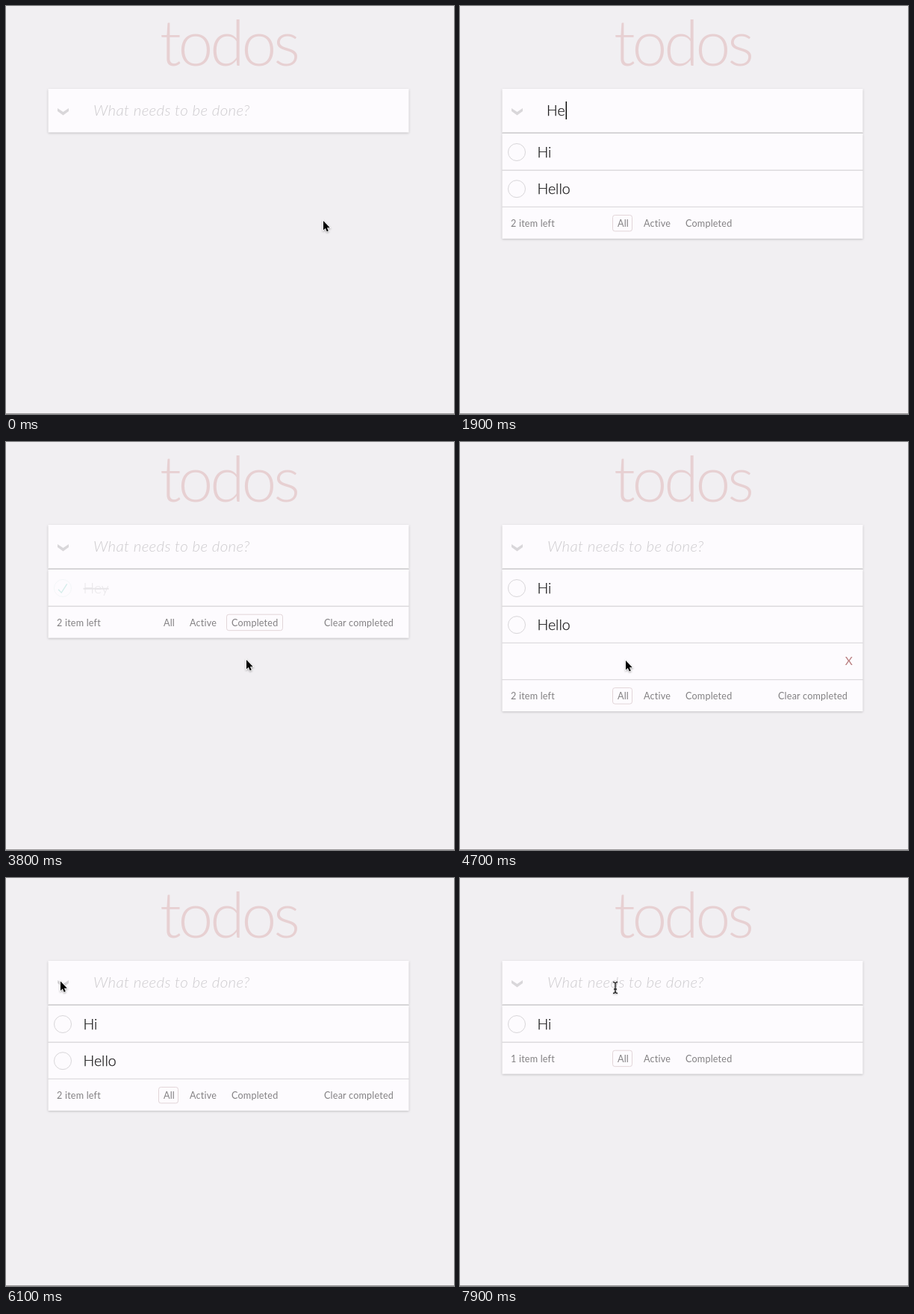
An HTML page that plays this animation: 600 by 547 pixels, repeating every 8000 ms.

```html
<!DOCTYPE html>
<html lang="en">
<head>
<meta charset="utf-8">
<title>todos</title>
<style>
html, body { margin: 0; width: 100%; height: 100%; overflow: hidden; background: #f1eff2; }
svg { display: block; font-family: Lato, "Open Sans", sans-serif; }
.title { font-size: 84px; font-weight: 300; letter-spacing: -4.1px; fill: #e7d0d2; }
.panel { fill: #fdfbfe; filter: drop-shadow(0 1px 1.5px rgba(0, 0, 0, .2)); }
.hint { font-size: 20.5px; font-weight: 300; font-style: italic; letter-spacing: .33px; fill: #cdcbce; }
.item { font-size: 19.5px; font-weight: 300; fill: #1d1c1d; stroke: #1d1c1d; stroke-width: .25; }
.done { fill: #d3d1d4; stroke: none; text-decoration: line-through; }
.foot { font-size: 12.6px; letter-spacing: .2px; fill: #838183; }
.kill { font-size: 15.5px; fill: #b97c7e; }
</style>
</head>
<body>
<svg id="stage" width="600" height="547" viewBox="0 0 600 547"></svg>
<script>
const LOOP = 8000, STEP = 100, TOP = 171, ROW = 49.2;
const stage = document.getElementById('stage');
const clamp = u => Math.min(1, Math.max(0, u));
const text = (cls, x, y, s) => `<text class="${cls}" x="${x}" y="${y}">${s}</text>`;

const words = [
  { name: 'Hi', from: 300, t: 900 },
  { name: 'Hello', from: 1000, t: 1400 },
  { name: 'Hey', from: 1800, t: 2100 }
];
const blurAt = 2700;

// Each stop of the pointer: click time, place, time it rests there, effect
const stop = (t, x, y, act = () => {}, rest = 0) => ({ t, x, y, act, rest });
const show = filter => s => { s.filter = filter; };
const check = (...names) => s => {
  s.items.filter(d => names.includes(d.name)).forEach(d => { d.done = !d.done; });
  s.clear = true;
};
const clear = s => {
  s.items = s.items.filter(d => !d.done);
  s.clear = false;
};
const stops = [
  stop(0, 425, 288, undefined, 2200),
  stop(blurAt, 77, 296, check('Hey')),
  stop(3300, 263, 350, show('Active')),
  stop(3600, 322, 292, show('Completed'), 200),
  stop(4200, 259, 243, show('Active')),
  stop(4700, 222, 293, show('All')),
  stop(5400, 523, 297, s => { s.items.pop(); }, 100),
  stop(6500, 73, 138.5, check('Hi', 'Hello')),
  stop(7000, 76, 194, check('Hi')),
  stop(7500, 471, 292, clear),
  stop(7900, 208, 147)
];
const add = w => ({ t: w.t, act: s => s.items.push({ name: w.name, done: false }) });
const events = [...words.map(add), ...stops].sort((a, b) => a.t - b.t);

function stateAt(t) {
  const s = { items: [], filter: 'All', clear: false, changed: 0 };
  for (const e of events.filter(e => e.t <= t)) {
    e.act(s);
    s.changed = e.t;
  }
  return s;
}

function pointerAt(t) {
  const i = stops.findLastIndex(p => p.t <= t);
  const a = stops[i], b = stops[i + 1] || a, leave = a.t + a.rest;
  const u = clamp((t - leave) / Math.max(1, Math.min(500, b.t - leave)));
  const e = u * (2 - u);
  return { x: a.x + (b.x - a.x) * e, y: a.y + (b.y - a.y) * e, shown: t < words[0].from || t >= stops[0].rest };
}

function typedAt(t) {
  const w = words.find(w => t >= w.from && t < w.t);
  return w ? w.name.slice(0, 1 + Math.floor((t - w.from) / 80)) : '';
}

function row(d, i, fade, hover) {
  const y = TOP + ROW * i, mid = y + 25;
  const mark = d.done
    ? `<g transform="translate(64.2 ${mid - 11.8}) scale(.235)" opacity=".5">
       <circle cx="50" cy="50" r="49" fill="none" stroke="#d3e5e3" stroke-width="4"/>
       <path d="M72 25L42 71 27 56l-4 4 20 20 34-52z" fill="#5dc2af"/></g>`
    : `<circle cx="76" cy="${mid}" r="11.5" fill="none" stroke="#d8d6d9"/>`;
  const label = text(d.done ? 'item done' : 'item', 103.5, mid + 7, d.name);
  return `<g opacity="${d.done ? fade : 1}">${mark}${label}</g>
    <path d="M56 ${y + ROW}h484" stroke="#dddbde" stroke-width="1.4"/>` +
    (hover ? text('kill', 515.7, mid + 5, 'X') : '');
}

function footer(s, y) {
  const tabs = { All: [211, 13], Active: [246, 34], Completed: [302, 62] };
  const [x, w] = tabs[s.filter];
  const left = s.items.filter(d => !d.done).length;
  return `<rect x="${x - 6.5}" y="${y - 15.5}" width="${w + 13}" height="21.5" rx="3" fill="none" stroke="#e2d5d8"/>` +
    text('foot', 68, y, left + ' item left') +
    Object.keys(tabs).map(k => text('foot', tabs[k][0], y, k)).join('') +
    (s.clear ? text('foot', 426, y, 'Clear completed') : '');
}

function cursor({ x, y, shown }) {
  if (!shown) return '';
  const beam = x > 100 && x < 540 && y > 111 && y < 169;
  const d = beam ? 'M-3-7.5q3 0 3 2.5V5q0 2.5-3 2.5M3-7.5q-3 0-3 2.5V5q0 2.5 3 2.5M-2 2h4'
    : 'M0 0v12.6l2.8-2.6 2 4.5 2-.9-1.9-4.3h3.9z';
  const paint = beam ? 'fill="none" stroke="#222" stroke-width="1.3"'
    : 'stroke="#fff" stroke-width="1.6" paint-order="stroke"';
  return `<path d="${d}" transform="translate(${x} ${y})" ${paint} style="filter:drop-shadow(0 1px 1px #0005)"/>`;
}

function list(s, t, at) {
  const rows = s.items.filter(d => s.filter === 'All' || d.done === (s.filter === 'Completed'));
  const height = ROW * rows.length;
  const over = at.shown ? Math.floor((at.y - TOP) / ROW) : -1;
  const fade = clamp((t - s.changed) / 400);
  return `<rect class="panel" x="56.5" y="${TOP}" width="483" height="${height + 42.5}"/>
    <path d="M56.5 170.4h483" stroke="#cfcdd0" stroke-width="1.4"/>` +
    rows.map((d, i) => row(d, i, fade, i === over)).join('') + footer(s, TOP + height + 26.5);
}

function draw(t) {
  const s = stateAt(t), typed = typedAt(t), at = pointerAt(t);
  const caret = t >= 100 && t < blurAt && (t - 100) % 800 < 700;

  stage.innerHTML = text('title', 206, 80, 'todos') +
    '<rect class="panel" x="56.5" y="111" width="483" height="58.5"/>' +
    '<path d="M69 137l7.5 5 7.5-5v4l-7.5 5.6-7.5-5.6z" fill="#d9d7da"/>' +
    (typed ? text('item typed', 116, 147, typed) : text('hint', 117, 147, 'What needs to be done?')) +
    (caret ? '<rect id="caret" x="114.5" y="128" width="1.4" height="24"/>' : '') +
    (s.items.length ? list(s, t, at) : '') +
    '<path d="M0 546.5h600" stroke="#989698"/>' + cursor(at);

  const word = stage.querySelector('.typed');
  if (word && caret) document.getElementById('caret').setAttribute('x', 117 + word.getComputedTextLength());
}

let shown = -1;
const start = performance.now();
function tick() {
  const t = Math.floor((performance.now() - start) % LOOP / STEP) * STEP;
  if (t !== shown) draw(shown = t);
  requestAnimationFrame(tick);
}
tick();
</script>
</body>
</html>
```
